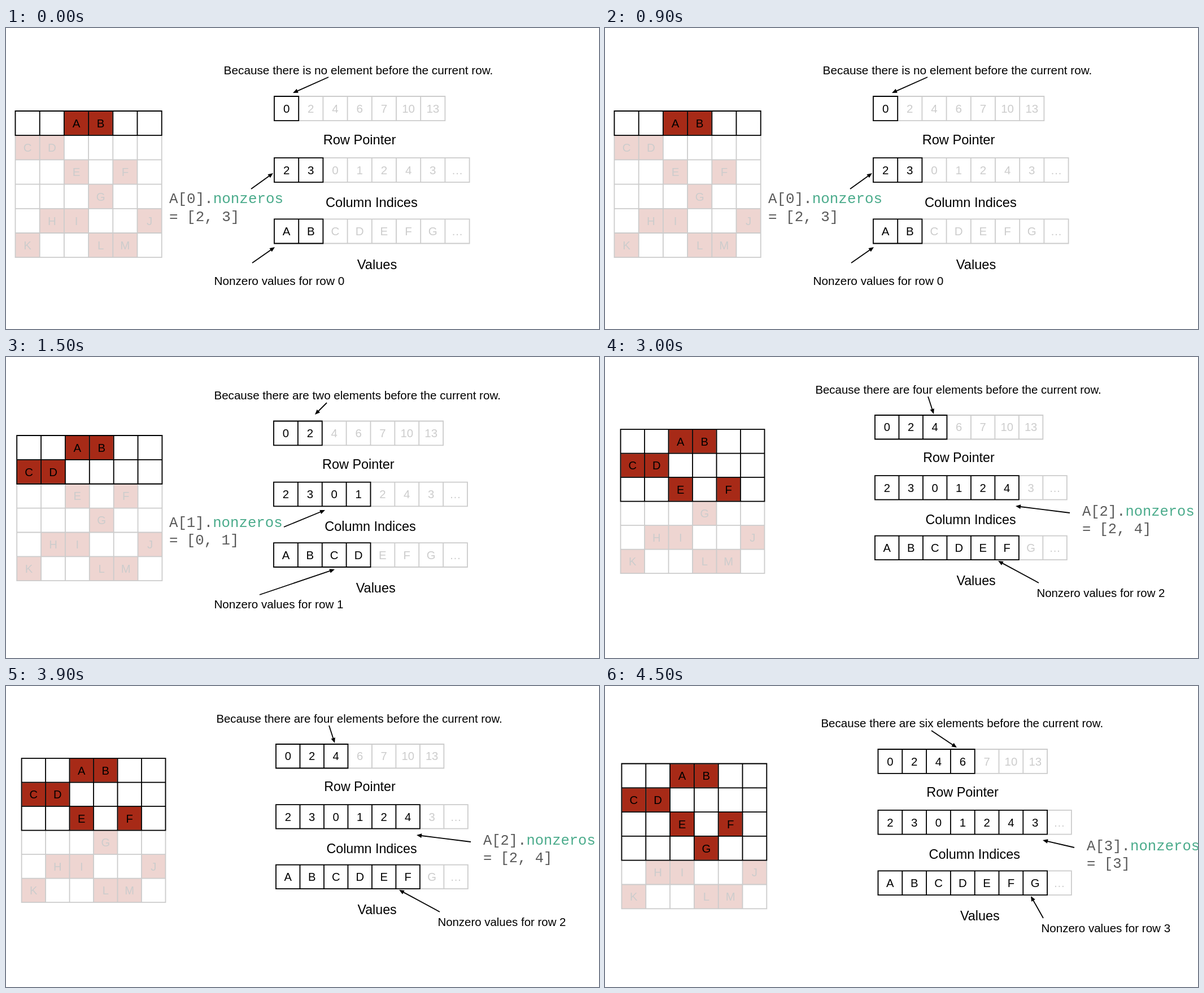
An HTML page that plays this animation: 1050 px wide and 533 px high, repeating every 6000 ms.

```html
<!DOCTYPE html>
<html lang="en">
<head>
<meta charset="utf-8">
<title>Compressed sparse rows</title>
<style>
  html, body { margin: 0; width: 100%; height: 100%; overflow: hidden; background: #fff; }
  svg { display: block; width: 1050px; height: 533px; font-family: "Liberation Sans", Arial, sans-serif; }
  .scene { visibility: hidden; animation: show 6s step-end infinite; }
  @keyframes show {
    0% { visibility: visible; }
    25%, 100% { visibility: hidden; }
  }
  .mid { text-anchor: middle; }
  .faint { fill: #ccc; }
  .grid { fill: none; stroke: #000; stroke-width: 1.8; stroke-linecap: square; }
  .grid.off { stroke: #ccc; }
  .on { fill: #a72a17; }
  .off { fill: #eed5d1; }
  .arrow { stroke: #000; stroke-width: 1.8; }
  .code { font-family: "Liberation Mono", "Courier New", monospace; fill: #5a5a5a; white-space: pre; }
  .code tspan { fill: #4aab8b; }
</style>
</head>
<body>
<svg id="stage" viewBox="0 0 1050 533"></svg>
<script>
const matrix = ["  AB  ", "CD    ", "  E F ", "   G  ", " HI  J", "K  LM "];
const pointers = [0, 2, 4, 6, 7, 10, 13];
const columns = [2, 3, 0, 1, 2, 4, 3, "…"];
const values = [..."ABCDEFG…"];

// c: cell size; positions are [x, y]; arrows are [x1, y1, x2, y2]
const scenes = [
  { c: 43.2, grid: [16.5, 147], lists: [475, 121], why: "is no element", whyAt: [385.6, 82],
    code: [289, 310], found: "2, 3", note: [368.4, 455],
    arrows: [[571, 87, 508, 115], [434, 285, 473, 257], [436, 416, 476, 388]] },
  { c: 42.87, grid: [19.2, 139], lists: [474, 113.5], why: "are two elements", whyAt: [368.4, 75],
    code: [289, 301], found: "0, 1", note: [368.4, 445],
    arrows: [[568, 81, 547, 102], [492, 301, 565, 271], [449, 421, 582, 376]] },
  { c: 42.48, grid: [27.6, 128.2], lists: [478, 103], why: "are four elements", whyAt: [372.4, 65],
    code: [845, 281], found: "2, 4", note: [764.4, 425],
    arrows: [[572, 70, 582, 101], [823, 276, 727, 264], [768, 400, 696, 361]] },
  { c: 42.8, grid: [29.5, 137.5], lists: [483.5, 112], why: "are six elements", whyAt: [382.4, 73],
    code: [853, 291], found: "3", note: [772.4, 436],
    arrows: [[578, 79, 623, 109], [831, 286, 775, 273], [776, 411, 754, 372]] },
];

const text = (x, y, size, str, cls = "") =>
  `<text x="${x}" y="${y}" font-size="${size}" class="${cls}">${str}</text>`;

function lines(x, y, cols, rows, c, cls) {
  let d = "";
  for (let i = 0; i <= cols; i++) d += `M${x + i * c} ${y}v${rows * c}`;
  for (let j = 0; j <= rows; j++) d += `M${x} ${y + j * c}h${cols * c}`;
  return `<path class="grid ${cls}" d="${d}"/>`;
}

const label = (x, y, c, str, lit) =>
  text(x + c / 2, y + c * 0.67, c * 0.475, str, lit ? "mid" : "mid faint");

function list(x, y, c, items, lit) {
  return lines(x, y, items.length, 1, c, "off") + lines(x, y, lit, 1, c, "") +
    items.map((v, i) => label(x + i * c, y, c, v, i < lit)).join("");
}

function table(x, y, c, lit) {
  let cells = "", labels = "";
  matrix.forEach((row, j) => [...row].forEach((v, i) => {
    if (v === " ") return;
    const px = x + i * c, py = y + j * c;
    cells += `<rect x="${px}" y="${py}" width="${c}" height="${c}" class="${j < lit ? "on" : "off"}"/>`;
    labels += label(px, py, c, v, j < lit);
  }));
  return cells + lines(x, y, 6, 6, c, "off") + lines(x, y, 6, lit, c, "") + labels;
}

function arrow([x1, y1, x2, y2]) {
  const len = Math.hypot(x2 - x1, y2 - y1);
  const turn = Math.atan2(y2 - y1, x2 - x1) * 180 / Math.PI;
  return `<g transform="translate(${x1} ${y1}) rotate(${turn})">` +
    `<path class="arrow" d="M0 0H${len - 6}"/><path d="M${len} 0l-9 -3.8v7.6z"/></g>`;
}

function draw(s, k) {
  const { c } = s, [x, y] = s.lists, [cx, cy] = s.code;
  const lit = matrix.slice(0, k + 1).join("").replace(/ /g, "").length;
  const body = c * 0.481, head = c * 0.547, mono = c * 0.6;
  const y2 = y + c * 2.52, y3 = y + c * 5.03;
  return `<g class="scene" style="animation-delay:${k * 1.5 - 6}s">` +
    table(...s.grid, c, k + 1) +
    list(x, y, c, pointers, k + 1) +
    list(x, y2, c, columns, lit) +
    list(x, y3, c, values, lit) +
    text(x + c * 3.495, y + c * 1.965, head, "Row Pointer", "mid") +
    text(x + c * 3.99, y2 + c * 2.015, head, "Column Indices", "mid") +
    text(x + c * 4.215, y3 + c * 2.06, head, "Values", "mid") +
    text(...s.whyAt, body, `Because there ${s.why} before the current row.`) +
    text(...s.note, body, `Nonzero values for row ${k}`) +
    text(cx, cy, mono, `A[${k}].<tspan>nonzeros</tspan>`, "code") +
    text(cx, cy + c * 0.73, mono, `= [${s.found}]`, "code") +
    s.arrows.map(arrow).join("") + "</g>";
}

document.getElementById("stage").innerHTML = scenes.map(draw).join("");
</script>
</body>
</html>
```
